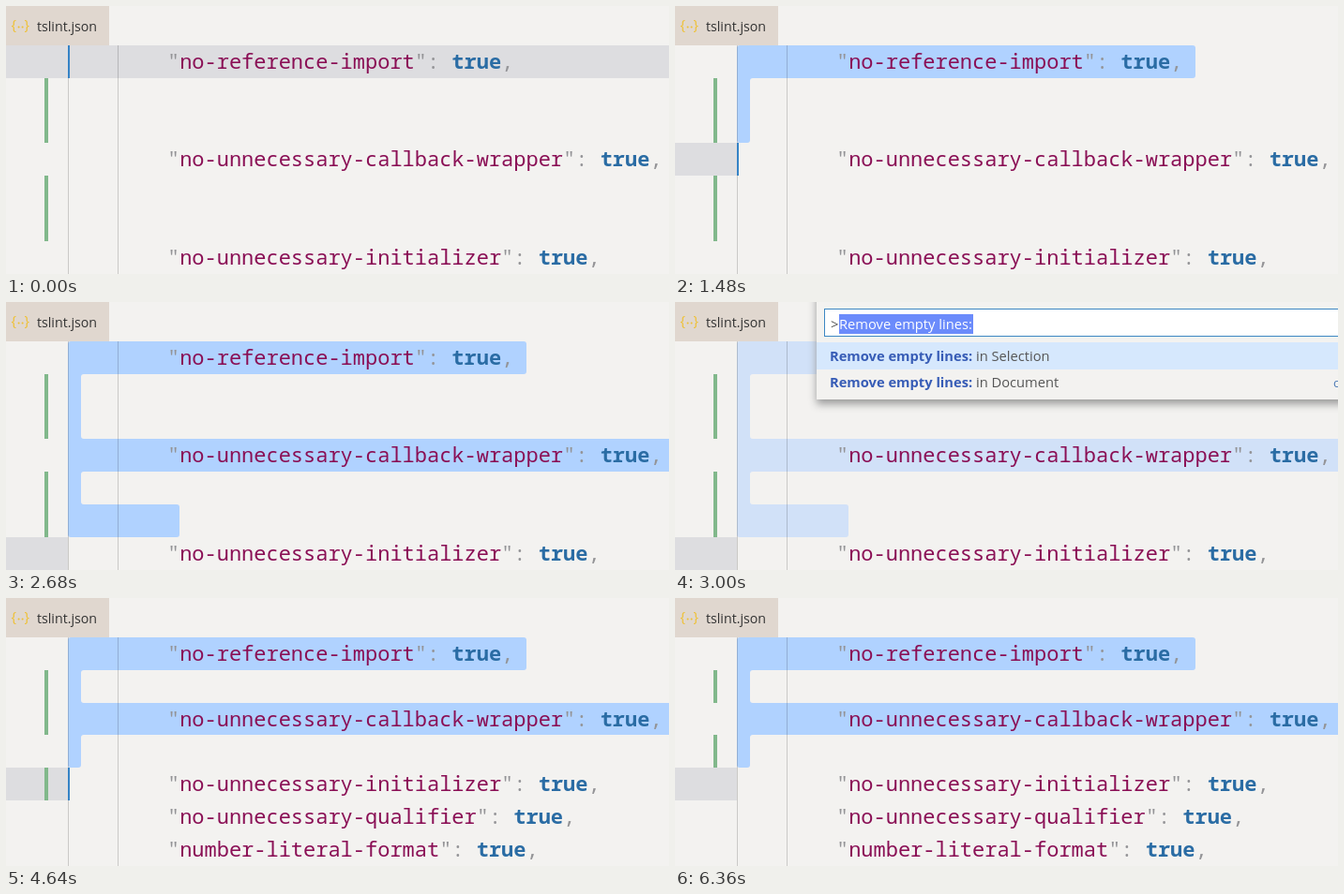
Write an HTML page that moves like this. It is 707x286 px and loops after 6.44 s.

```html
<!DOCTYPE html>
<html lang="en">
<head>
<meta charset="utf-8">
<title>Remove empty lines</title>
<style>
  html, body { margin: 0; width: 100%; height: 100%; overflow: hidden; background: #f3f2f0; }
  svg { display: block; }
  text { white-space: pre; }
  .code { font: 21.99px "Noto Sans Mono", monospace; fill: #8a0f55; }
  .code .mark { fill: #949497; }
  .code .bool { fill: #2a6ca4; font-weight: bold; }
  .ui { font: 14.7px "Open Sans", sans-serif; fill: #555; }
  .ui .hit { font-weight: bold; fill: #375cb6; }
  #palette { filter: drop-shadow(0 5px 4px #9a9a9a); }
</style>
</head>
<body>
<svg width="707" height="286" viewBox="0 0 707 286">
  <rect width="707" height="286" fill="#f3f2f0"/>
  <rect id="current" height="35" fill="#dddde0"/>
  <path id="selection"/>
  <path d="M66.5 42V286M119.5 42V286" stroke="#000" stroke-opacity=".17"/>
  <g id="bars" fill="#81b88b"></g>
  <g id="lines"></g>
  <rect id="cursor" x="66" width="2" fill="#3583c6"/>

  <rect width="110" height="42" fill="#e0d7cf"/>
  <g fill="#efc02f" font-family="Open Sans, sans-serif" font-size="14.5">
    <text x="5.5" y="25">{</text>
    <text x="19.5" y="25">}</text>
    <circle cx="13.6" cy="22.5" r="1"/>
    <circle cx="17.6" cy="22.5" r="1"/>
  </g>
  <text class="ui" x="33" y="27" style="font-size:14.2px; fill:#333">tslint.json</text>

  <g id="palette" class="ui">
    <rect x="151" y="-20" width="600" height="124" fill="#f3f2f0"/>
    <rect x="159.5" y="7.5" width="580" height="29" fill="#fff" stroke="#3d87c3"/>
    <rect x="175" y="13" width="143" height="21" fill="#6b8bfb"/>
    <text x="166" y="29">&gt;</text>
    <text x="175" y="29" style="fill:#fff">Remove empty lines:</text>
    <rect x="151" y="43" width="600" height="29" fill="#d6e8fd"/>
    <text x="165" y="63"><tspan class="hit">Remove empty lines:</tspan> in Selection</text>
    <text x="165" y="91"><tspan class="hit">Remove empty lines:</tspan> in Document</text>
    <text x="702" y="91" style="font-size:13px; fill:#4a78b4">other commands</text>
  </g>
</svg>
<script>
const LOOP = 6440, CHAR = 13.194, LEFT = 66, INDENT = " ".repeat(8);
const $ = id => document.getElementById(id);
const rule = name => `${INDENT}"${name}": true,`;
const top_ = row => Math.round(42 + 34.8 * row);

const before = [
  rule("no-reference-import"), "", "",
  rule("no-unnecessary-callback-wrapper"), "", INDENT,
  rule("no-unnecessary-initializer")
];
const after = [
  before[0], "", before[3], "", before[6],
  rule("no-unnecessary-qualifier"), rule("number-literal-format")
];

// Each step changes part of the state; row is the cursor's line.
const steps = [
  [0, { lines: before, bars: [[1, 3], [4, 6]], row: 0, cursor: 1, palette: false }],
  [80, { cursor: .5 }], [160, { cursor: 0 }],
  [600, { cursor: .25 }], [680, { cursor: .65 }], [760, { cursor: 1 }],
  [1000, { row: 1 }], [1320, { row: 2 }], [1480, { row: 3 }],
  [1600, { row: 4 }], [1760, { row: 5 }], [1920, { row: 6 }],
  [2640, { cursor: .5 }], [2680, { cursor: 0 }],
  [3000, { palette: true }],
  [4600, { palette: false, cursor: 1 }],
  [4640, { lines: after, bars: [[1, 3], [4, 5]], row: 4 }],
  [4800, { bars: [[1, 2], [3, 4]] }],
  [5280, { cursor: .7 }], [5320, { cursor: .35 }], [5400, { cursor: 0 }],
  [5880, { cursor: .5 }], [5960, { cursor: 1 }],
  [6280, { cursor: .5 }], [6360, { cursor: 0 }]
];
let state = {};
const states = steps.map(([, change]) => state = { ...state, ...change });

function roundedPath(points, radius) {
  const toward = (a, b) => {
    const k = radius / Math.hypot(b[0] - a[0], b[1] - a[1]);
    return [a[0] + (b[0] - a[0]) * k, a[1] + (b[1] - a[1]) * k];
  };
  const n = points.length;
  return points.map((p, i) => {
    const into = toward(p, points[(i + n - 1) % n]);
    const out = toward(p, points[(i + 1) % n]);
    return `${i ? "L" : "M"}${into}Q${p} ${out}`;
  }).join("") + "Z";
}

function selectionPath(lines) {
  if (!lines.length) return "";
  const right = line => Math.round(LEFT + .4 + (line.length + 1) * CHAR);
  const points = [[LEFT, top_(0)]];
  lines.forEach((line, i) => {
    const x = right(line);
    if (i && right(lines[i - 1]) === x) points.pop();
    else points.push([x, top_(i)]);
    points.push([x, top_(i + 1)]);
  });
  points.push([LEFT, top_(lines.length)]);
  return roundedPath(points, 3);
}

function codeText(line, row) {
  const name = line.split('"')[1];
  if (!name) return "";
  const mark = s => `<tspan class="mark">${s}</tspan>`;
  return `<text class="code" x="${LEFT + .4 + 8 * CHAR}" y="${top_(row) + 25}">` +
    mark('"') + name + mark('": ') + `<tspan class="bool">true</tspan>` + mark(",") + "</text>";
}

function set(id, attributes) {
  for (const key in attributes) $(id).setAttribute(key, attributes[key]);
}

function draw({ lines, bars, row, cursor, palette }) {
  const y = top_(row), height = top_(row + 1) - y;
  set("current", { y, height, width: row ? LEFT : 707 });
  set("cursor", { y, height, opacity: cursor });
  set("selection", { d: selectionPath(lines.slice(0, row)), fill: palette ? "#d1e1f8" : "#b0d2ff" });
  set("palette", { visibility: palette ? "visible" : "hidden" });
  $("bars").innerHTML = bars.map(([from, to]) =>
    `<rect x="41" width="4" y="${top_(from)}" height="${top_(to) - top_(from)}"/>`).join("");
  $("lines").innerHTML = lines.map(codeText).join("");
}

const start = performance.now();
let shown = -1;
function tick() {
  const time = (performance.now() - start) % LOOP;
  const index = steps.findLastIndex(([at]) => at <= time);
  if (index !== shown) draw(states[shown = index]);
  requestAnimationFrame(tick);
}
tick();
</script>
</body>
</html>
```
